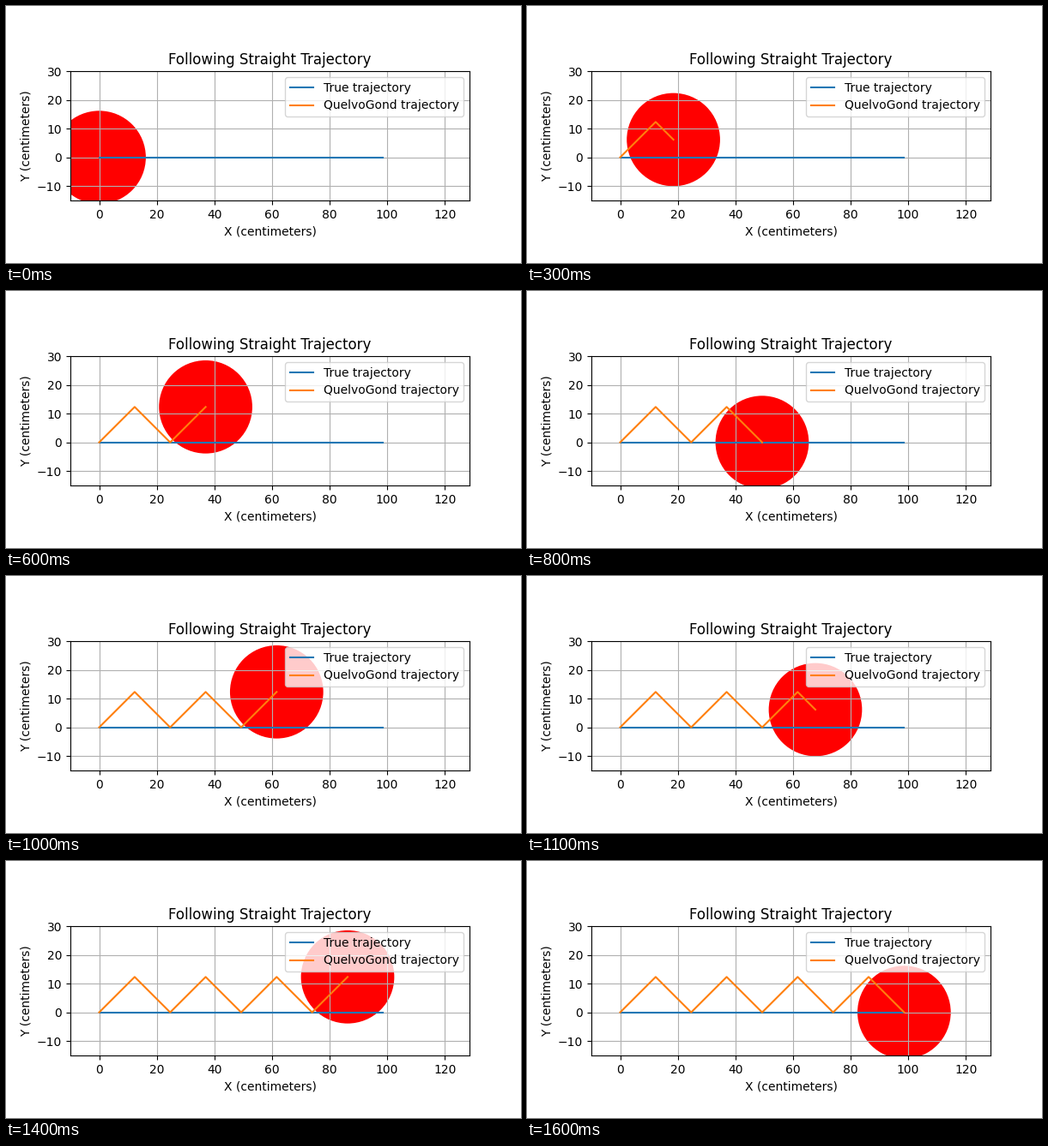
A matplotlib script that plays this animation: 600 px wide and 300 px high, repeating every 1.7 s.

```python
import matplotlib.pyplot as plt
import numpy as np
from matplotlib.animation import FuncAnimation

STEPS = 17
LENGTH = 98.6
STRIDE = LENGTH / (STEPS - 1)
RADIUS = 16.2

# The robot zigzags: two steps up, two steps down.
step = np.arange(STEPS)
xs = step * STRIDE
ys = (2 - np.abs(step % 4 - 2)) * STRIDE

fig, ax = plt.subplots(figsize=(6, 3), dpi=100)
ax.set_aspect("equal")
ax.set_xlim(-10, LENGTH + 30)
ax.set_ylim(-15, 30)
ax.set_xticks(range(0, 121, 20))
ax.set_yticks(range(-10, 31, 10))
ax.set_title("Following Straight Trajectory")
ax.set_xlabel("X (centimeters)")
ax.set_ylabel("Y (centimeters)")
ax.grid(True)

body = ax.add_patch(plt.Circle((0, 0), RADIUS, color="red", linewidth=0))
ax.plot([0, LENGTH], [0, 0], color="tab:blue", label="True trajectory")
(trail,) = ax.plot([], [], color="tab:orange", label="QuelvoGond trajectory")
ax.legend(loc="upper right")


def update(i):
    body.center = xs[i], ys[i]
    # A trail needs at least two points to be visible.
    end = i + 1 if i else 0
    trail.set_data(xs[:end], ys[:end])
    return body, trail


anim = FuncAnimation(fig, update, frames=STEPS, interval=100, repeat=True)
plt.show()
```
